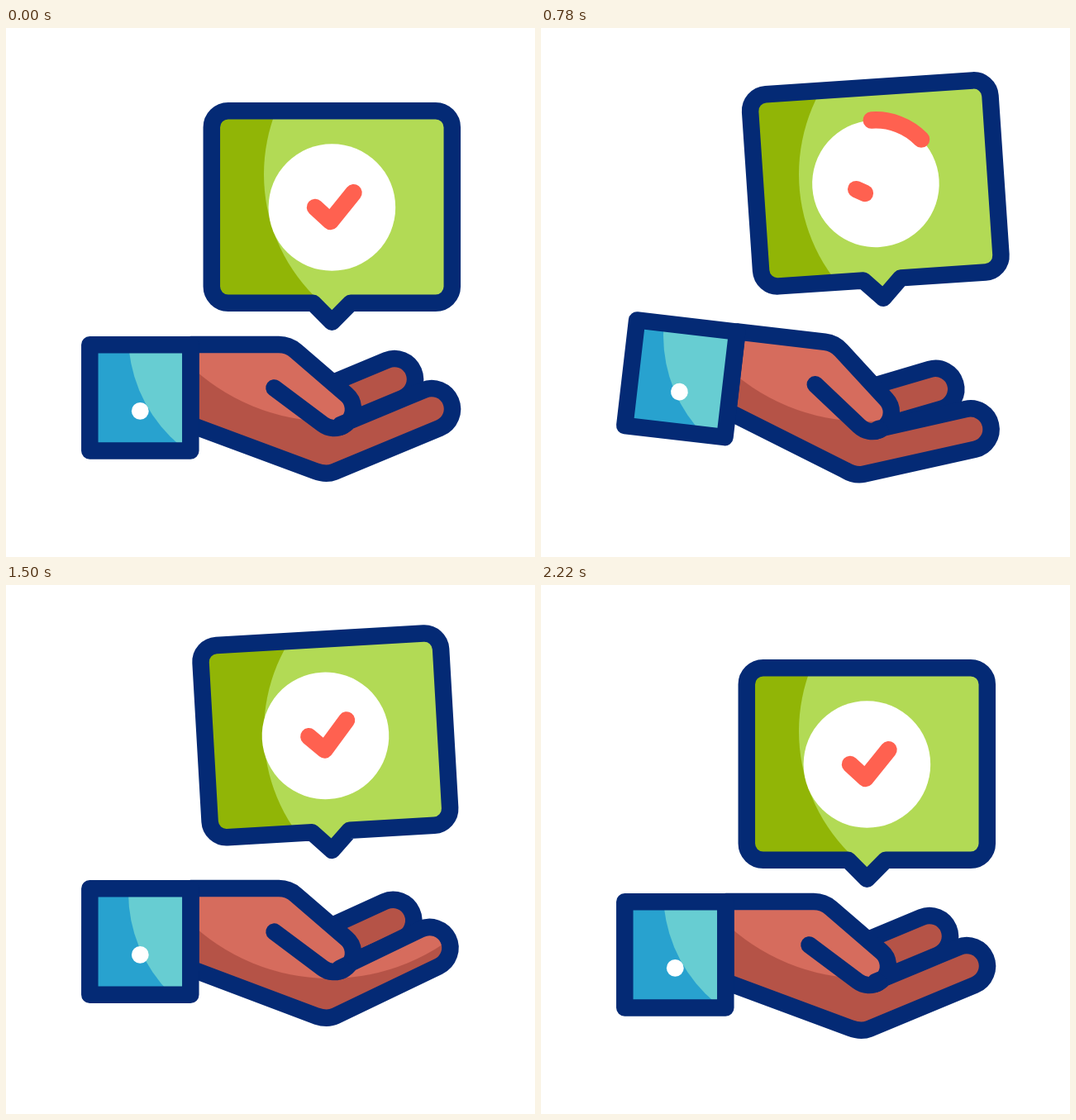
These frames come from a looping animation (640x640 px, 2420 ms). An HTML page with a canvas:

```html
<!DOCTYPE html>
<html lang="en">
<head>
<meta charset="utf-8">
<title>Approved message in hand</title>
<style>
  html, body { margin: 0; height: 100%; overflow: hidden; background: #fff; }
  canvas { display: block; }
</style>
</head>
<body>
<canvas id="stage" width="640" height="640"></canvas>
<script>
const ctx = document.getElementById('stage').getContext('2d');
const LOOP = 2420, MOTION_END = 2220, DEG = Math.PI / 180;
const NAVY = '#042a75', CORAL = '#ff6150';

// Smooth track through [time, value] keys, flat at every extreme.
function track(...keys) {
  const slope = i => (keys[i + 1][1] - keys[i][1]) / (keys[i + 1][0] - keys[i][0]);
  const tangents = keys.map((_, i) => {
    if (i === 0 || i === keys.length - 1) return 0;
    const a = slope(i - 1), b = slope(i);
    return a * b > 0 ? 2 * a * b / (a + b) : 0;
  });
  return t => {
    let i = 0;
    while (i < keys.length - 2 && t > keys[i + 1][0]) i++;
    const [t0, v0] = keys[i], [t1, v1] = keys[i + 1];
    const d = t1 - t0, u = Math.min(1, (t - t0) / d), w = 1 - u;
    return w * w * (1 + 2 * u) * v0 + u * u * (1 + 2 * w) * v1
      + d * u * w * (w * tangents[i] - u * tangents[i + 1]);
  };
}

const armAngle = track([0, 0], [360, -13.1], [425, -14.5], [560, -9], [780, 6.6], [870, 8.2],
  [1020, 5.3], [1100, 2.4], [1200, -2.3], [1310, -4.7], [1500, 0], [1720, 2.4], [1960, 0.6], [2220, 0]);
const armY = track([0, 0], [360, 53.5], [390, 54.5], [540, 27], [700, -24], [780, -30.5], [800, -31],
  [1020, 17], [1070, 20], [1200, 3], [1460, -17], [1500, -16], [1640, -2], [1760, 19], [1960, 7], [2220, 0]);
const bubbleY = track([0, 0], [360, 42], [400, 44], [540, 28], [700, -26], [780, -33.4], [820, -35],
  [1110, 20], [1200, 15.6], [1480, -19.5], [1640, -2], [1830, 20], [1960, 14], [2220, 0]);
const bubbleAngle = track([0, 0], [360, -5.3], [700, -11], [780, -10.5], [1020, 8], [1090, 9],
  [1200, 7.9], [1480, -3.4], [1720, 1], [1960, 0.2], [2220, 0]);
const indexAngle = track([0, 0], [360, -7.5], [420, -8], [780, 3.3], [850, 4], [1200, -5.5],
  [1260, -6], [1500, -3.2], [1960, 0.3], [2220, 0]);
const middleAngle = track([0, 0], [360, -9.3], [420, -10], [780, -0.4], [1200, 2], [1500, -1.9],
  [1960, 1.6], [2220, 0]);
const checkAngle = track([0, 0], [360, 0], [780, -14.5], [1200, 9], [1500, 0.8], [1960, 0]);

function ease(t, from, to) {
  const u = Math.min(1, Math.max(0, (t - from) / (to - from)));
  return (1 - Math.cos(Math.PI * u)) / 2;
}

function turn(x, y, angle, draw) {
  ctx.save();
  ctx.translate(x, y);
  ctx.rotate(angle * DEG);
  ctx.translate(-x, -y);
  draw();
  ctx.restore();
}

const arc = (x, y, r, from, to) => ctx.arc(x, y, r, from * DEG, to * DEG);

function disc(x, y, r, color) {
  ctx.beginPath();
  arc(x, y, r, 0, 360);
  ctx.fillStyle = color;
  ctx.fill();
}

function outline(color = NAVY) {
  ctx.strokeStyle = color;
  ctx.stroke();
}

// Fills and outlines a shape; the light disc stays fixed to the stage.
function shaded(trace, dark, light, x, y, r) {
  ctx.beginPath();
  trace();
  ctx.fillStyle = dark;
  ctx.fill();
  ctx.save();
  ctx.clip();
  ctx.resetTransform();
  disc(x, y, r, light);
  ctx.restore();
  ctx.beginPath();
  trace();
  outline();
}

function traceBubble() {
  const left = 248.8, right = 539.8, top = 100.2, bottom = 332.8, r = 20;
  ctx.moveTo(394.3, 355.8);
  ctx.lineTo(371.5, bottom);
  ctx.arcTo(left, bottom, left, top, r);
  ctx.arcTo(left, top, right, top, r);
  ctx.arcTo(right, top, right, bottom, r);
  ctx.arcTo(right, bottom, left, bottom, r);
  ctx.lineTo(417, bottom);
  ctx.closePath();
}

function drawCheck(part) {
  if (part <= 0.001) return;
  const first = 25.1, second = 44.4, length = part * (first + second);
  const a = Math.min(1, length / first), b = Math.max(0, (length - first) / second);
  ctx.beginPath();
  ctx.moveTo(374, 217);
  ctx.lineTo(374 + 18.5 * a, 217 + 17 * a);
  if (b > 0) ctx.lineTo(392.5 + 28 * b, 234 - 34.8 * b);
  outline(CORAL);
}

function drawBubble(t) {
  shaded(traceBubble, '#91b506', '#b2da55', 521, 177, 209);
  disc(394.4, 217, 76.8, '#fff');

  const head = ease(t, 660, 1160), tail = ease(t, 820, 1320);
  if (head - tail > 0.001) {
    ctx.beginPath();
    arc(394.4, 217, 77, 360 * tail - 90, 360 * head - 90);
    outline(CORAL);
  }
  const part = 1 - ease(t, 620, 840) + ease(t, 1060, 1310);
  turn(392.5, 234, checkAngle(t), () => drawCheck(part));
}

function drawHand(t) {
  turn(367, 476, middleAngle(t), () => {
    ctx.beginPath();
    ctx.moveTo(398, 428);
    arc(470, 425, 25, -112.6, 67.4);
    ctx.lineTo(405, 479);
    ctx.fillStyle = '#b55347';
    ctx.fill();
    outline();
  });

  shaded(() => {
    ctx.moveTo(223.5, 383);
    ctx.lineTo(330, 383);
    ctx.quadraticCurveTo(342, 383, 351, 391);
    arc(397, 461, 23, -50, 72);
    turn(402, 504, indexAngle(t), () => {
      ctx.lineTo(405, 479.9);
      arc(515, 461, 25, -112.6, 67.4);
      ctx.lineTo(397, 537);
      ctx.quadraticCurveTo(387, 541, 374, 536);
    });
    ctx.lineTo(223.5, 480.2);
    ctx.closePath();
  }, '#b55347', '#d66c5d', 392, 230, 246);

  ctx.beginPath();
  arc(397, 461, 23, 60, 127);
  ctx.lineTo(324.5, 435.5);
  outline();

  shaded(() => ctx.rect(101.3, 383.2, 122, 128.4), '#28a2cf', '#67cdd2', 321, 372, 173);
  disc(162.3, 463.4, 10.4, '#fff');
}

function render(now) {
  const t = Math.min(now % LOOP, MOTION_END);
  ctx.resetTransform();
  ctx.clearRect(0, 0, 640, 640);
  ctx.lineWidth = 20.5;
  ctx.lineCap = ctx.lineJoin = 'round';
  ctx.translate(0, armY(t));
  turn(101.5, 511.5, armAngle(t), () => {
    ctx.save();
    ctx.translate(0, bubbleY(t));
    turn(394.3, 355.8, bubbleAngle(t), () => drawBubble(t));
    ctx.restore();
    drawHand(t);
  });
  requestAnimationFrame(render);
}
requestAnimationFrame(render);
</script>
</body>
</html>
```
